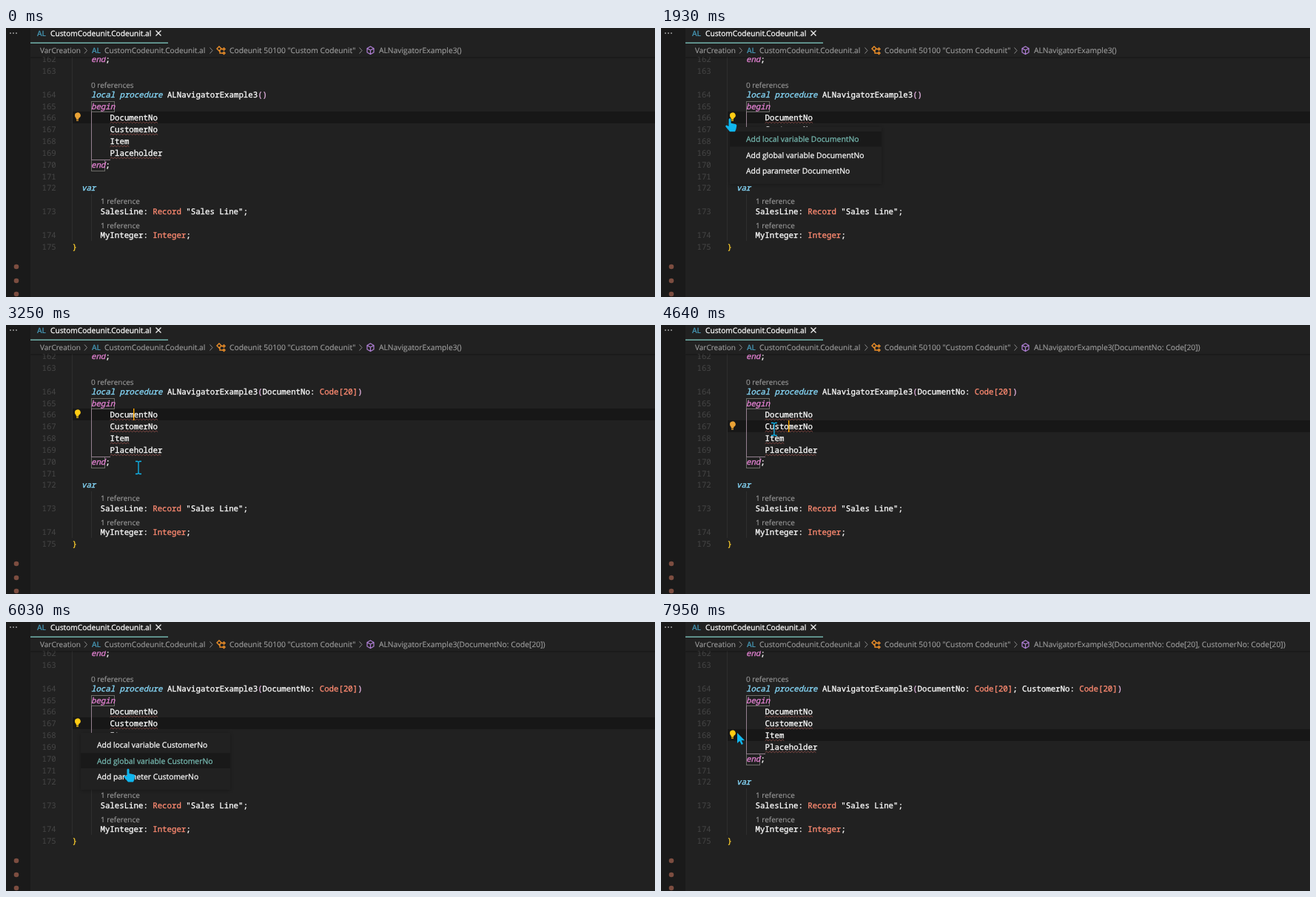
Recreate the animation shown at these times as an HTML page. Size 877 by 364 pixels, loop 8 s.

```html
<!DOCTYPE html>
<html lang="en">
<head>
<meta charset="utf-8">
<title>Add parameter code action</title>
<style>
  html, body { margin: 0; height: 100%; overflow: hidden; background: #212121; }
  svg { display: block; width: 100vw; height: 100vh; }
  text { white-space: pre; text-rendering: geometricPrecision; color: #fff; }
  text, tspan { fill: currentColor; stroke: currentColor; }
  .code { font: 500 10.72px "Noto Sans Mono", "Liberation Mono", monospace; stroke-width: .3px; }
  .ui { font-family: "Open Sans", "Noto Sans", sans-serif; stroke-width: .15px; }
  .bright { stroke-width: .25px; }
  .lang { color: #4593b0; font-weight: 600; font-size: 10px; }
  .crumb { color: #9c9c9c; }
  .lens { color: #999; font-size: 10px; }
  .num { color: #464646; font-weight: 400; stroke-width: 0; }
  .kw { color: #89ddff; font-style: italic; }
  .block { color: #e583d4; font-style: italic; }
  .paren { color: #e6b4e2; }
  .type { color: #ff8b72; }
  .brace { color: #ffd02e; }
  .line { fill: none; }
  .squiggle { fill: none; stroke: #94504b; stroke-width: .8; }
  .menu { filter: drop-shadow(0 1px 2px #0004); }
  .cursor { fill: #10b6ee; }
</style>
</head>
<body>
<svg viewBox="0 0 877 364" preserveAspectRatio="none">
  <rect width="877" height="364" fill="#212121"/>
  <rect width="33" height="364" fill="#1a1a1a"/>
  <g fill="#a8a8a8"><circle cx="6" cy="7" r=".9"/><circle cx="10" cy="7" r=".9"/><circle cx="14" cy="7" r=".9"/></g>
  <g fill="#7c4d40"><circle cx="14" cy="323" r="3.3"/><circle cx="14" cy="342" r="3.3"/><circle cx="14" cy="360" r="3.3"/></g>

  <rect id="active" x="90" y="113" width="787" height="16" fill="#171717"/>
  <g class="line" stroke="#2e2e2e">
    <path d="M89.5 39V288M115.5 225V288"/>
  </g>
  <g class="line" stroke="#6c6c68">
    <rect x="115.5" y="99.5" width="31" height="14"/>
    <rect x="115.5" y="178.5" width="18" height="15"/>
  </g>
  <path class="line" stroke="#94808f" d="M115.5 113V178.500H141"/>
  <g id="code"></g>

  <rect x="33" y="0" width="844" height="39" fill="#212121"/>
  <rect x="33" y="39" width="844" height="2" fill="#000" opacity=".18"/>
  <rect x="33" y="19.500" width="186" height="1.300" fill="#80cbc4"/>
  <g class="ui">
    <text class="lang" x="42" y="10.500">AL</text>
    <text class="bright" x="60" y="10.500" font-size="10.200">CustomCodeunit.Codeunit.al</text>
    <text class="crumb" x="46" y="34" font-size="10">VarCreation</text>
    <text class="lang" x="116" y="34">AL</text>
    <text class="crumb" x="133" y="34" font-size="10.200">CustomCodeunit.Codeunit.al</text>
    <text class="crumb" x="302" y="34" font-size="10.300">Codeunit 50100 "Custom Codeunit"</text>
    <text class="crumb" id="crumb" x="504" y="34" font-size="10.300"></text>
  </g>
  <path class="line" stroke="#f0f0f0" stroke-width="1.300" d="M202.500 3.500l7 7m0-7l-7 7"/>
  <path class="line" stroke="#8c8c8c" d="M106 26.500l3.500 4-3.500 4M275.500 26.500l3.500 4-3.500 4M477.500 26.500l3.500 4-3.500 4"/>
  <path class="line" stroke="#ee8f28" stroke-width="1.400" d="M285 28l3-3 3 3-3 3zM290 28.500h3M289 30v4h4M293 28.500l1.500-1.500 1.500 1.500-1.500 1.500zM293 34l1.500-1.500 1.500 1.500-1.500 1.500z"/>
  <path class="line" stroke="#b180d7" stroke-width="1.200" d="M492.500 25l4.500 2.500v5.500l-4.500 2.500-4.500-2.500v-5.500zM488 27.500l4.500 2.500 4.500-2.500M492.500 30v5.500"/>

  <g id="bulb"><path d="M-3.500-1.500a3.900 3.900 0 1 1 5.500 3.300l-.5 2h-3l-.5-2a3.900 3.900 0 0 1-1.500-3.300zM-1.500 4.600h3v1.200h-3z"/></g>
  <rect id="caret" x="172" width="1.400" height="16" fill="#ffa800"/>
  <g id="menus"></g>
  <g id="cursor" class="cursor">
    <path id="beam" fill="none" stroke="#10b6ee" stroke-width="1.300" d="M-4-8.500h2.500l1.500 1 1.500-1h2.500M-4 8.500h2.500l1.500-1 1.500 1h2.500M0-7.500v15"/>
    <path id="arrow" d="M0 0v14l3.300-3 2.400 5 2.300-1.100-2.400-4.700h4.600z"/>
    <path id="hand" d="M-1.500 1q0-1.500 1.500-1.500t1.500 1.500v5l6 1.200q1.800.4 1.800 2.200l-1 5-1.300 3h-7l-5.500-6.500q-.8-1.600.8-2.200l3.200 1.500z"/>
  </g>
</svg>
<script>
const $ = id => document.getElementById(id);
const CHAR = 6.432, LOOP = 8000;
const span = (cls, s) => `<tspan class="${cls}">${s}</tspan>`;
const code = (x, y, body, cls = '', id = '') =>
  `<text class="code ${cls}" id="${id}" x="${x}" y="${y + 4}">${body}</text>`;
const lens = (x, y, s) => `<text class="ui lens" x="${x}" y="${y + 4}">${s}</text>`;

const lineY = n => n < 164 ? 42 + 16 * (n - 162)
  : n < 173 ? Math.floor(90.17 + 15.85 * (n - 164))
  : [248, 280, 296][n - 173];

function word(n, name) {
  const y = lineY(n) + 7, steps = Math.round(name.length * CHAR / 4.3);
  return code(140.6, lineY(n), name) +
    `<path class="squiggle" d="M140.6 ${y + .8}${'l2.15-1.8 2.15 1.8'.repeat(steps)}"/>`;
}

let listing = '';
for (let n = 162; n <= 175; n++) listing += code(48.5, lineY(n), n, 'num');
const end = span('block', 'end') + ';';
listing += code(115, lineY(162), end) + lens(115, 77, '0 references') +
  code(115, lineY(164), '', '', 'signature') +
  code(115, lineY(165), 'begin', 'block') +
  ['DocumentNo', 'CustomerNo', 'Item', 'Placeholder'].map((s, i) => word(166 + i, s)).join('') +
  code(115, lineY(170), end) + code(102, lineY(172), 'var', 'kw') +
  lens(128, 234, '1 reference') +
  code(127.5, lineY(173), 'SalesLine: ' + span('type', 'Record') + ' "Sales Line";') +
  lens(128, 267, '1 reference') +
  code(127.5, lineY(174), 'MyInteger: ' + span('type', 'Integer') + ';') +
  code(89.5, lineY(175), '}', 'brace');
$('code').innerHTML = listing;

const params = ['DocumentNo', 'CustomerNo'];
const signatures = [0, 1, 2].map(n =>
  span('kw', 'local procedure') + ' ALNavigatorExample3' + span('paren', '(') +
  params.slice(0, n).map(p => p + ': ' + span('type', 'Code[20]')).join('; ') + span('paren', ')'));
const crumbs = [0, 1, 2].map(n =>
  'ALNavigatorExample3(' + params.slice(0, n).map(p => p + ': Code[20]').join(', ') + ')');

const menus = [
  { name: params[0], x: 93, y: 134, width: 205, from: 1930, to: 3080 },
  { name: params[1], x: 101, y: 150, width: 202, from: 5410, to: 6410 }
];
$('menus').innerHTML = menus.map(m => `<g transform="translate(${m.x} ${m.y})">
  <rect class="menu" width="${m.width}" height="77" fill="#212121"/>
  <rect class="hover" width="${m.width}" height="20.5" fill="#191919"/>` +
  ['local variable', 'global variable', 'parameter'].map((kind, i) =>
    `<text class="ui bright" font-size="10.37" x="22" y="${20 + 21.5 * i}">Add ${kind} ${m.name}</text>`).join('') +
  '</g>').join('');
menus.forEach((m, i) => {
  m.el = $('menus').children[i];
  m.hover = m.el.querySelector('.hover');
  m.rows = m.el.querySelectorAll('text');
});

// Pointer hotspot: time, x, y
const path = [
  [70, 576, 312], [620, 200, 104], [840, 173, 118], [1010, 173, 120],
  [1240, 145, 128], [1480, 118, 128], [1780, 93, 122], [2160, 93, 124],
  [2470, 176, 170], [2780, 179, 193], [3630, 179, 193], [4320, 173, 139],
  [4490, 172, 139], [4640, 153, 141], [5260, 101, 141], [5720, 101, 142],
  [6030, 165, 199], [6250, 165, 210], [6720, 165, 210], [7100, 150, 153],
  [7250, 150, 153], [7330, 150, 151], [7480, 150, 151], [7950, 103, 150]
];
function pointer(t) {
  const i = path.findIndex(k => k[0] > t);
  if (i < 0) return path[path.length - 1].slice(1);
  if (!i) return path[0].slice(1);
  const a = path[i - 1], b = path[i], f = (t - a[0]) / (b[0] - a[0]);
  return [1, 2].map(k => a[k] + (b[k] - a[k]) * f);
}

const within = (t, ...spans) => spans.some(([a, b]) => t >= a && t < b);
const count = (t, ...times) => times.filter(at => t >= at).length;
const show = (el, on) => el.setAttribute('visibility', on ? 'visible' : 'hidden');
const cache = {};
function swap(id, html) {
  if (cache[id] !== html) $(id).innerHTML = cache[id] = html;
}

function draw(t) {
  const [x, y] = pointer(t);
  swap('signature', signatures[count(t, 3160, 6490)]);
  swap('crumb', crumbs[count(t, 3700, 6750)]);

  const row = 166 + count(t, 4400, 7290);
  $('active').setAttribute('y', lineY(row) - 8);
  $('caret').setAttribute('y', lineY(row) - 8);
  $('caret').setAttribute('x', row === 168 ? 153 : 172);
  show($('caret'), within(t, [900, 1400], [3160, 3750], [4400, 4880], [6490, 7060], [7290, 7790]));

  const bulbY = lineY(166 + count(t, 4490, 7560)) - 1;
  $('bulb').setAttribute('transform', `translate(96.5 ${bulbY})`);
  $('bulb').setAttribute('fill', within(t, [0, 1780], [4490, 5260]) ? '#eaa235' : '#ffcc14');

  for (const m of menus) {
    show(m.el, within(t, [m.from, m.to]));
    const hot = Math.max(0, Math.min(2, Math.floor((y - m.y - 7) / 21.5)));
    m.hover.setAttribute('y', 6 + 21.5 * hot);
    m.rows.forEach((r, i) => r.style.color = i === hot ? '#78bdb4' : '#fff');
  }

  const hand = within(t, [1560, 3240], [5150, 6550]);
  const arrow = within(t, [1440, 1560], [5050, 5150], [7800, LOOP]);
  $('cursor').setAttribute('transform', `translate(${x.toFixed(1)} ${y.toFixed(1)})`);
  show($('hand'), hand);
  show($('arrow'), arrow);
  show($('beam'), t >= 70 && !hand && !arrow);
}

function tick() {
  draw(performance.now() % LOOP);
  requestAnimationFrame(tick);
}
tick();
</script>
</body>
</html>
```
